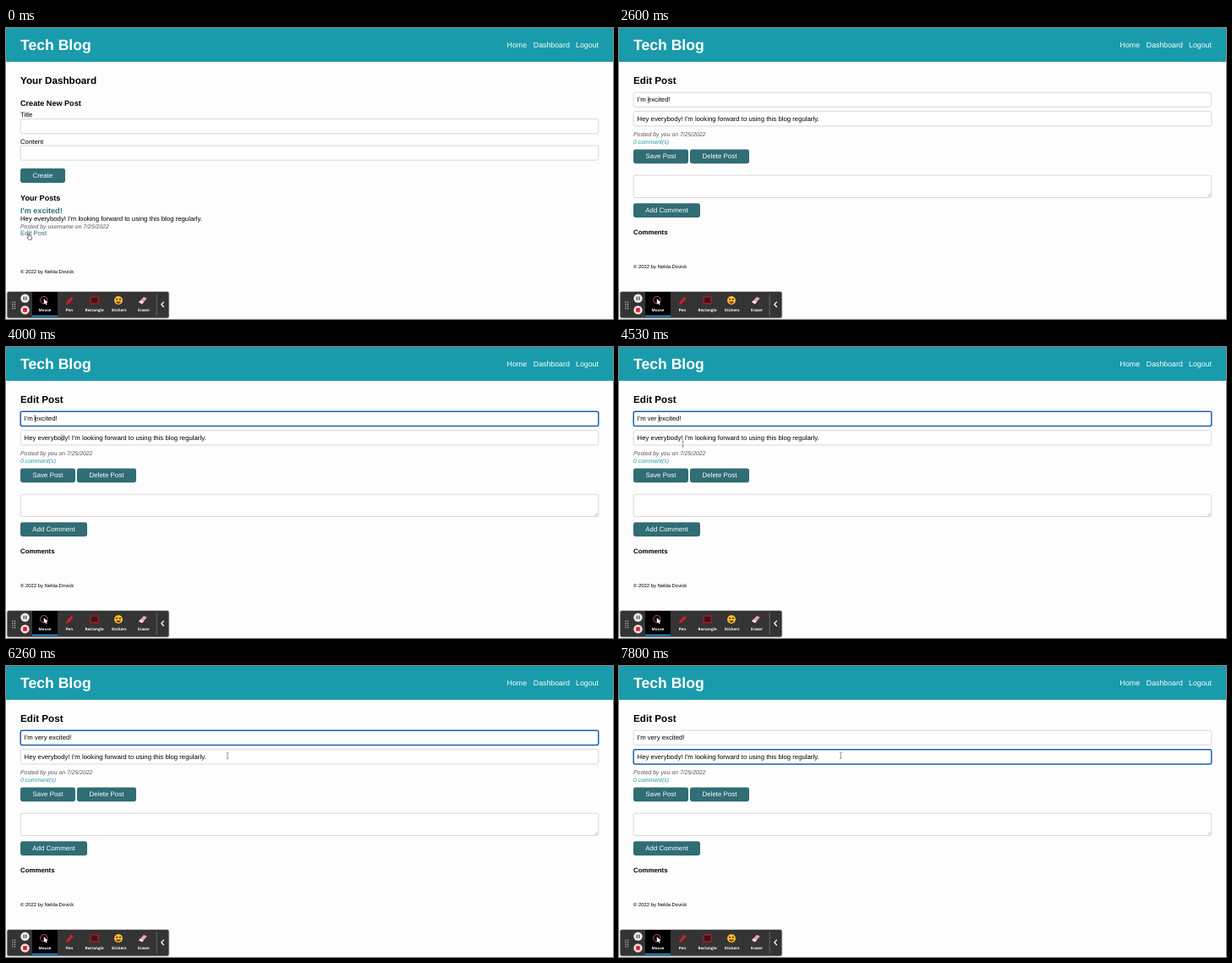
Write an HTML page that moves like this. It is 718 by 344 pixels and loops after 8000 ms.

```html
<!DOCTYPE html>
<html lang="en">
<head>
<meta charset="utf-8">
<title>Tech Blog</title>
<style>
  html, body { margin: 0; width: 100%; height: 100%; overflow: hidden; background: #fdfdfd; }
  svg { display: block; width: 100%; height: 100%; }
  text { font: 7.78px "Liberation Sans", Arial, sans-serif; text-rendering: geometricPrecision; }
  .h1 { font-size: 17.6px; font-weight: bold; fill: #fff; }
  .h2 { font-size: 11.7px; font-weight: bold; }
  .h3 { font-size: 9.1px; font-weight: bold; }
  .h4 { font-size: 7.85px; font-weight: bold; }
  .nav { font-size: 8.8px; fill: #fff; }
  .meta { font-size: 6.87px; font-style: italic; fill: #555; }
  .foot { font-size: 5.9px; }
  .teal { fill: #1a9bab; }
  .link { fill: #2c7279; }
  .label { font-size: 7.9px; fill: #fff; }
  .button { fill: #306d75; }
  .field { fill: #fff; stroke: #cfcfcf; stroke-width: .8; }
  .field.focus { stroke: #1b62a8; stroke-width: 1.5; }
  .tool { font: bold 4.5px "Open Sans", Roboto, sans-serif; fill: #fff; text-anchor: middle; }
</style>
</head>
<body>
<svg viewBox="0 0 718 344">
  <rect width="718" height="344" fill="#fdfdfd"/>
  <rect width="718" height="40" fill="#1a9bab"/>
  <text class="h1" x="17" y="26">Tech Blog</text>
  <text class="nav" x="592.6" y="23">Home</text>
  <text class="nav" x="623.8" y="23">Dashboard</text>
  <text class="nav" x="674" y="23">Logout</text>

  <g id="dashboard">
    <text class="h2" x="17" y="65.6">Your Dashboard</text>
    <text class="h3" x="17" y="92">Create New Post</text>
    <text x="17" y="105.3">Title</text>
    <rect class="field" x="17.2" y="107.6" width="683.6" height="17.2" rx="2"/>
    <text x="17" y="136.6">Content</text>
    <rect class="field" x="17.2" y="139" width="683.6" height="17.2" rx="2"/>
    <rect class="button" x="17" y="166" width="53" height="17" rx="2.4"/>
    <text class="label" x="31.5" y="177">Create</text>
    <text class="h3" x="17" y="203.6">Your Posts</text>
    <text class="h3 link" x="17" y="218.6">I'm excited!</text>
    <text x="17" y="227.8">Hey everybody! I'm looking forward to using this blog regularly.</text>
    <text class="meta" x="17" y="236.7">Posted by username on 7/25/2022</text>
    <text class="link" x="17" y="245.4">Edit Post</text>
    <text class="foot" x="17" y="290">© 2022 by Nelda Dovick</text>
    <path d="M26.2 247.5V243.4q.7-.9 1.4 0V245.6l2.6.6q.7.3.5 1.3l-.6 2.8h-3.2l-1.9-2.6q0-1 1.2-.2z"
          fill="#fff" stroke="#222" stroke-width=".6"/>
  </g>

  <g id="editor">
    <text class="h2" x="17" y="65.6">Edit Post</text>
    <rect class="field" id="titleBox" x="17.2" y="76.2" width="683.6" height="17.2" rx="2"/>
    <text id="title" x="21.6" y="87.3"></text>
    <rect class="field" id="bodyBox" x="17.2" y="98.7" width="683.6" height="17.2" rx="2"/>
    <text id="body" x="21.6" y="109.8">Hey everybody! I'm looking forward to using this blog regularly.</text>
    <rect id="caret" width=".7" height="8.6"/>
    <text class="meta" x="17" y="127.8">Posted by you on 7/25/2022</text>
    <text class="meta teal" x="17" y="136.6">0 comment(s)</text>
    <rect class="button" x="17" y="143.5" width="65" height="16.7" rx="2.4"/>
    <text class="label" x="31.5" y="154.4">Save Post</text>
    <rect class="button" x="84" y="143.5" width="70" height="16.7" rx="2.4"/>
    <text class="label" x="98.6" y="154.4">Delete Post</text>
    <rect class="field" x="17.2" y="174.2" width="683.6" height="26.3" rx="2"/>
    <path d="M696.4 199.6l3.4-3.4M698.4 199.6l1.4-1.4" stroke="#777" stroke-width=".5"/>
    <rect class="button" x="17" y="207.3" width="79" height="16.7" rx="2.4"/>
    <text class="label" x="31.3" y="218.2">Add Comment</text>
    <text class="h4" x="17" y="243.6">Comments</text>
    <text class="foot" x="17" y="284.3">© 2022 by Nelda Dovick</text>
    <path id="arrow" d="M0 0V5.4L1.3 4.3L2.3 6.5L3.2 6.1L2.2 4H3.9Z" fill="#111" stroke="#fff" stroke-width=".4"/>
    <path id="beam" d="M-1.4-3.5Q0-3.5 0-2.7Q0-3.5 1.4-3.5M0-2.7V2.7M-1.4 3.5Q0 3.5 0 2.7Q0 3.5 1.4 3.5"
          fill="none" stroke="#555" stroke-width=".6"/>
  </g>

  <g id="toolbar">
    <rect x=".8" y="311.2" width="192.4" height="32" rx="2.5" fill="#a5a5a5"/>
    <rect x="1.6" y="312" width="190.8" height="30.4" rx="2" fill="#343434"/>
    <rect x="31" y="312" width="30" height="29.4"/>
    <rect x="31" y="339.8" width="30" height="1.6" fill="#1c9be6"/>
    <path d="M7.9 323.5v9M10.5 323.5v9" stroke="#ccc" stroke-width="1.2" stroke-dasharray="1.2 1.3"/>
    <circle cx="22.5" cy="319.6" r="5.2" fill="#eee"/>
    <path d="M21.2 317.5v4.2M23.8 317.5v4.2" stroke="#333" stroke-width="1.2"/>
    <circle cx="22.5" cy="333.4" r="5.2" fill="#f2dede"/>
    <rect x="20.2" y="331.1" width="4.6" height="4.6" rx=".5" fill="#d8202f"/>
    <circle cx="44.8" cy="321.6" r="4.2" fill="none" stroke="#d9606a" stroke-width=".9"/>
    <path d="M44.8 320v6.6l1.6-1.3 1.1 2.3 1.1-.5-1-2.3h2z" fill="#fff"/>
    <path d="M71 327l1-3.2 5.2-6 2.4 2-5.4 6z" fill="#d81f2b"/>
    <rect x="100.2" y="318" width="8.8" height="7.8" fill="#3b1518" stroke="#b81822" stroke-width="1.3"/>
    <circle cx="133" cy="322" r="5" fill="#f6bd2e"/>
    <path d="M130 320.7h2.3M133.8 320.7h2.3" stroke="#4a3010" stroke-width="1.3"/>
    <path d="M130.2 323.3h5.6q-.5 2.7-2.8 2.7t-2.8-2.7z" fill="#8a3b1c"/>
    <path d="M157 324.3l6-6.6 3.8 1.8-5.7 6.7z" fill="#ee9fb4"/>
    <path d="M157 324.3l2-2.2 3.9 2-1.8 2.1z" fill="#f8dce3"/>
    <text class="tool" x="46" y="334.8">Mouse</text>
    <text class="tool" x="75" y="334.8">Pen</text>
    <text class="tool" x="104.5" y="334.8">Rectangle</text>
    <text class="tool" x="133.7" y="334.8">Stickers</text>
    <text class="tool" x="163" y="334.8">Eraser</text>
    <path d="M178.2 314v26" stroke="#777" stroke-width=".8"/>
    <path d="M186.8 323.6l-3 3.2 3 3.2" fill="none" stroke="#fff" stroke-width="1.3"/>
  </g>
</svg>
<script>
const LOOP = 8000, OPEN_EDITOR = 1330, FOCUS_TITLE = 2930, FOCUS_BODY = 7260;
const $ = id => document.getElementById(id);
const show = (id, on) => $(id).setAttribute('visibility', on ? 'visible' : 'hidden');

// [time, x, y]
const path = [
  [1330, 65.8, 94], [2060, 37.5, 87], [2200, 37.5, 87], [2460, 35, 85], [2860, 35, 85],
  [3200, 36.6, 85], [3460, 36.6, 85], [4260, 75.6, 114.6], [5460, 75.6, 114.6],
  [6260, 262, 106], [6600, 262, 106], [7000, 262.4, 106], [LOOP, 262.4, 106]
];
const typing = [
  [0, ''], [4330, 'v'], [4400, 've'], [4460, 'ver'], [4530, 'ver '],
  [5060, 'ver'], [5200, 'very'], [5260, 'very ']
];
const caretOn = [[2930, 3460], [3990, 5790], [6600, 7000], [7260, 7790]];

function mouseAt(t) {
  const i = Math.max(1, path.findIndex(p => p[0] > t));
  const [t0, x0, y0] = path[i - 1], [t1, x1, y1] = path[i];
  const u = Math.max(0, (t - t0) / (t1 - t0)), e = u * u * (3 - 2 * u);
  return [x0 + (x1 - x0) * e, y0 + (y1 - y0) * e];
}

function draw(t) {
  const editing = t >= OPEN_EDITOR;
  $('dashboard').style.display = editing ? 'none' : '';
  $('editor').style.display = editing ? '' : 'none';
  if (!editing) return;

  const typed = typing.filter(k => k[0] <= t).pop()[1];
  const inBody = t >= FOCUS_BODY;
  $('title').textContent = `I'm ${typed}excited!`;
  $('titleBox').classList.toggle('focus', t >= FOCUS_TITLE && !inBody);
  $('bodyBox').classList.toggle('focus', inBody);

  const field = $(inBody ? 'body' : 'title');
  const chars = inBody ? field.textContent.length : 4 + typed.length;
  $('caret').setAttribute('x', 21.6 + field.getSubStringLength(0, chars));
  $('caret').setAttribute('y', inBody ? 102.8 : 80.3);
  show('caret', caretOn.some(([a, b]) => t >= a && t < b));

  const [x, y] = mouseAt(t);
  const overField = y < 93.8 || y > 98.3;
  const pointer = overField ? 'beam' : 'arrow';
  $(pointer).setAttribute('transform', `translate(${x} ${y})`);
  show('beam', overField);
  show('arrow', !overField);
}

const start = performance.now();
function tick() {
  draw((performance.now() - start) % LOOP);
  requestAnimationFrame(tick);
}
tick();
</script>
</body>
</html>
```
